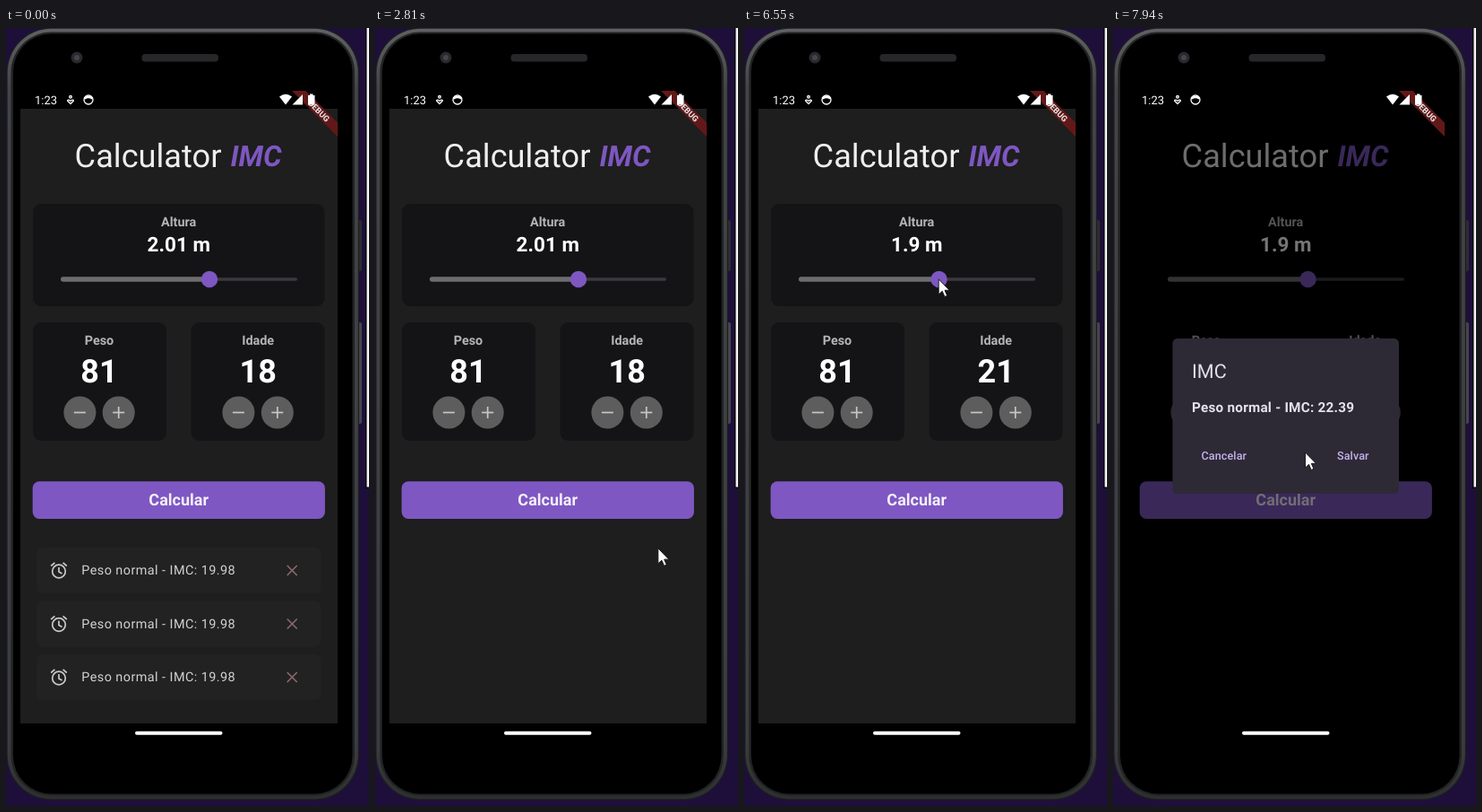
Write an HTML page that moves like this. It is 405 by 867 pixels and loops after 8 s.

```html
<!DOCTYPE html>
<html lang="pt">
<head>
<meta charset="utf-8">
<title>Calculator IMC</title>
<style>
  html, body { margin: 0; width: 100%; height: 100%; overflow: hidden; background: #1e0f3a; }
  svg { display: block; width: 405px; height: 867px; font-family: Roboto, sans-serif; text-rendering: geometricPrecision; }
  .mid { text-anchor: middle; }
  .bold { font-weight: 700; }
  .label { font-size: 14.4px; font-weight: 700; fill: #b5b5b5; text-anchor: middle; }
  .num { font-size: 36px; font-weight: 700; fill: #fff; text-anchor: middle; }
  .panel { fill: #141416; }
  .knob { fill: #5d5d5d; }
  .sign { stroke: #c6c6c6; stroke-width: 1.7; }
  .row rect { fill: #222223; }
  .row text { font-size: 14.4px; letter-spacing: .45px; fill: #d2d2d2; }
  .alarm { fill: none; stroke: #c9c9cb; stroke-width: 1.7; }
  .close { stroke: #8a696b; stroke-width: 1.7; }
  .action { font-size: 12.6px; font-weight: 500; letter-spacing: .09px; fill: #c5b3ee; }
</style>
</head>
<body>
<svg viewBox="0 0 405 867">
  <defs>
    <clipPath id="btnClip"><rect x="29.700" y="505.200" width="326.200" height="41.700" rx="7.500"/></clipPath>
    <radialGradient id="glow">
      <stop offset="0" stop-color="#fff" stop-opacity=".2"/>
      <stop offset=".5" stop-color="#fff" stop-opacity=".1"/>
      <stop offset="1" stop-color="#fff" stop-opacity="0"/>
    </radialGradient>
    <linearGradient id="rim" x2="0" y2="1">
      <stop offset="0" stop-color="#5f6163"/>
      <stop offset=".08" stop-color="#424446"/>
      <stop offset=".93" stop-color="#3a3c3e"/>
      <stop offset="1" stop-color="#2c2e30"/>
    </linearGradient>
    <g id="alarm" class="alarm">
      <circle cy="1" r="7.300"/>
      <path d="M0-3.500V1.500L3.500 3.600M-8.800-5L-4.600-8.600M8.800-5L4.600-8.600"/>
    </g>
    <g id="minus"><circle class="knob" r="18"/><path class="sign" d="M-6.500 0H6.500"/></g>
  </defs>

  <!-- Desktop and phone body -->
  <rect width="405" height="867" fill="#1e0f3a"/>
  <path d="M401 0H405V513H401Z" fill="#08060c"/>
  <path d="M402.500 0H405V511.500H402.500Z" fill="#f4f4f4"/>
  <rect x="391" y="214" width="6" height="57" rx="2" fill="#2c2d30"/>
  <rect x="391" y="328" width="6" height="113" rx="2" fill="#44464a"/>
  <rect x=".5" y="-.5" width="393.500" height="861" rx="50" fill="#1c1d1f"/>
  <rect x="1.700" y=".7" width="391.100" height="858.600" rx="49" fill="url(#rim)"/>
  <rect x="5.500" y="4.500" width="383.500" height="851" rx="45" fill="#222325"/>
  <rect x="8" y="6.500" width="378.500" height="847" rx="42.500" fill="#000"/>
  <rect x="151.500" y="29" width="85.500" height="8.500" rx="4" fill="#27272a"/>
  <circle cx="79" cy="33" r="6.500" fill="#29292e"/>
  <circle cx="79" cy="33" r="3" fill="#45454f"/>

  <!-- App -->
  <rect id="bg" x="16" y="90" width="354" height="685" fill="#1e1e1e"/>
  <g id="panels" class="panel">
    <rect x="30" y="196" width="325.500" height="114" rx="9"/>
    <rect x="30" y="328" width="149" height="132" rx="9"/>
    <rect x="206.500" y="328" width="149" height="132" rx="9"/>
  </g>
  <g id="content">
    <text x="76.600" y="155.300" font-size="36.200" fill="#eee">Calculator</text>
    <text x="250.500" y="154" font-size="32.200" class="bold" font-style="italic" fill="#7e57c2">IMC</text>

    <text class="label" x="192.700" y="220.500">Altura</text>
    <text id="height" class="mid bold" x="192.700" y="249" font-size="22.500" fill="#fff"></text>
    <rect x="61" y="278.200" width="264" height="3.600" rx="1.800" fill="#3b393f"/>
    <rect id="fill" x="61" y="277.300" height="5.400" rx="2.700" fill="#6d6d6f"/>
    <circle id="halo" cy="280" r="21.500" fill="#fff" opacity=".05"/>
    <circle id="thumb" cy="280" r="9.200" fill="#7e57c2"/>

    <text class="label" x="104" y="353">Peso</text>
    <text class="num" x="104" y="394.800">81</text>
    <use href="#minus" x="82.400" y="428.500"/>
    <use href="#minus" x="125.700" y="428.500"/>
    <path class="sign" d="M125.700 422V435"/>

    <text class="label" x="281.200" y="353">Idade</text>
    <text id="age" class="num" x="281.200" y="394.800"></text>
    <use href="#minus" x="259.400" y="428.500"/>
    <use href="#minus" x="302.800" y="428.500"/>
    <path class="sign" d="M302.800 422V435"/>
    <circle id="plusHover" cx="302.800" cy="428.500" r="18" fill="#fff" opacity=".08"/>

    <g clip-path="url(#btnClip)">
      <rect x="29" y="505" width="328" height="43" fill="#7e57c2"/>
      <circle id="ripple" cx="183" cy="533" fill="url(#glow)"/>
      <rect id="splash" x="29" y="505" width="328" height="43" fill="#fff" opacity=".1"/>
    </g>
    <text class="mid bold" x="192.700" y="532" font-size="18" fill="#f3effa">Calcular</text>
    <g id="rows"></g>
  </g>

  <g id="dialog">
    <rect x="66.500" y="346" width="252.500" height="173" rx="5.500" fill="#2d2a36"/>
    <text x="88" y="390" font-size="21.600" fill="#e2dfe8">IMC</text>
    <text x="88" y="427.500" font-size="15.300" letter-spacing=".225" class="bold" fill="#e4e1ea">Peso normal - IMC: 22.39</text>
    <text class="action" x="98.500" y="481">Cancelar</text>
    <text class="action" x="250" y="481">Salvar</text>
  </g>

  <!-- Debug ribbon and system bars -->
  <path d="M319 70H334.400L370 105.600V121Z" fill="#621819"/>
  <text class="mid bold" transform="translate(349.200 92.400) rotate(45)" y="3.300" font-size="9.200" fill="#eee">DEBUG</text>
  <g fill="#fff">
    <text x="32" y="84.500" font-size="13">1:23</text>
    <path d="M305 76.500Q312 71 319 76.500L312 85.500Z"/>
    <path d="M331 74V85.500H319.500Z"/>
    <path d="M337 75H339V73.500H342.500V75H344.500V85.500H337Z"/>
  </g>
  <g fill="none" stroke="#fff" stroke-width="1.300">
    <circle cx="72" cy="76.800" r="1.300"/>
    <path d="M72 84.500L68.700 81.200Q68.500 79 72 81.200Q75.500 79 75.300 81.200Z"/>
    <circle cx="92" cy="80" r="5"/>
    <path d="M87.500 78.500Q92 75.500 96.500 78.500" stroke-width="2.600"/>
  </g>
  <rect x="144" y="783.800" width="97.500" height="4" rx="2" fill="#fff"/>

  <g id="cursor">
    <path d="M0 0V17L4 13.300L6.700 19.500L9.400 18.300L6.800 12.300H12Z" fill="#fff" stroke="#111" stroke-width=".9"/>
    <circle id="press" r="12" fill="#f0e41c" opacity=".5"/>
  </g>
</svg>
<script>
const $ = id => document.getElementById(id);
const show = (el, on) => { el.style.display = on ? '' : 'none'; };

const LOOP = 8000;
const ROW_Y = 604.5, ROW_STEP = 59.5, CLOSE_X = 319.2;
const removedAt = [2470, 2040, 1200];
const presses = [[1060, 1200], [1960, 2040], [2400, 2670], [3330, 3430],
                 [3510, 3560], [4040, 4170], [5010, 6550], [7200, 7280]];

// [time, x, y]
const path = [
  [220, 238, 705], [780, 318, 588], [990, 318, 589], [1200, 324, 599], [1800, 320.5, 614],
  [2070, 320.5, 614], [2400, 319, 606], [2670, 319, 606], [3250, 298, 430], [4270, 298, 430],
  [4720, 207, 285], [4860, 214, 278], [5010, 226, 278], [5270, 224, 278], [5410, 224, 278],
  [5750, 218.5, 278], [6100, 217.5, 278], [6520, 217.5, 278], [7130, 178.7, 534],
  [7600, 178.7, 534], [7940, 214.5, 473]
];
// [time, metres]
const heights = [[0, 2.01], [5010, 2.01], [5270, 1.97], [5410, 1.97], [5750, 1.91], [5890, 1.9]];

function at(track, t) {
  const i = track.findIndex(k => k[0] > t);
  if (i < 0) return track[track.length - 1].slice(1);
  if (i === 0) return track[0].slice(1);
  const a = track[i - 1], b = track[i];
  const u = (t - a[0]) / (b[0] - a[0]), e = u * u * (3 - 2 * u);
  return a.slice(1).map((v, n) => v + (b[n + 1] - v) * e);
}

$('rows').innerHTML = removedAt.map((_, i) => `
  <g class="row" transform="translate(0 ${ROW_Y + i * ROW_STEP})">
    <rect x="34" y="-25.500" width="317.500" height="51" rx="7"/>
    <use href="#alarm" x="59"/>
    <text x="84.300" y="4.800">Peso normal - IMC: 19.98</text>
    <path class="close" d="M${CLOSE_X - 5.5}-5.500l11 11m0-11l-11 11"/>
  </g>`).join('');
const rows = [...$('rows').children];

function draw(t) {
  const [x, y] = at(path, t);
  const near = (cx, cy, r) => t >= 220 && Math.hypot(x - cx, y - cy) < r;

  show($('cursor'), t >= 220);
  $('cursor').setAttribute('transform', `translate(${x} ${y})`);
  show($('press'), presses.some(([a, b]) => t >= a && t < b));

  rows.forEach((row, i) => {
    show(row, t < removedAt[i]);
    row.lastElementChild.style.stroke = near(CLOSE_X, ROW_Y + i * ROW_STEP, 20) ? '#e06c6c' : '';
  });

  const metres = Math.round(at(heights, t)[0] * 100) / 100;
  const tx = 227 + (metres - 2.01) * 86;
  $('height').textContent = metres + ' m';
  $('fill').setAttribute('width', tx - 61);
  $('thumb').setAttribute('cx', tx);
  $('halo').setAttribute('cx', tx);
  show($('halo'), t >= 5010 && t < 6550);

  $('age').textContent = t < 3430 ? 18 : t < 3560 ? 19 : t < 4170 ? 20 : 21;
  show($('plusHover'), near(302.8, 428.5, 18));

  show($('ripple'), t >= 7200 && t < 7370);
  $('ripple').setAttribute('r', Math.max(0, 10 + (t - 7200) * 0.35));
  show($('splash'), t >= 7370 && t < 7580);

  const open = t >= 7370, opening = open && t < 7440;
  show($('dialog'), open);
  $('dialog').setAttribute('opacity', opening ? 0.9 : 1);
  $('bg').setAttribute('fill', opening ? '#000016' : open ? '#000' : '#1e1e1e');
  $('panels').style.fill = open ? '#000' : '';
  $('content').setAttribute('opacity', opening ? 0.52 : open ? 0.46 : 1);
}

const start = performance.now();
function tick() {
  draw((performance.now() - start) % LOOP);
  requestAnimationFrame(tick);
}
tick();
</script>
</body>
</html>
```
